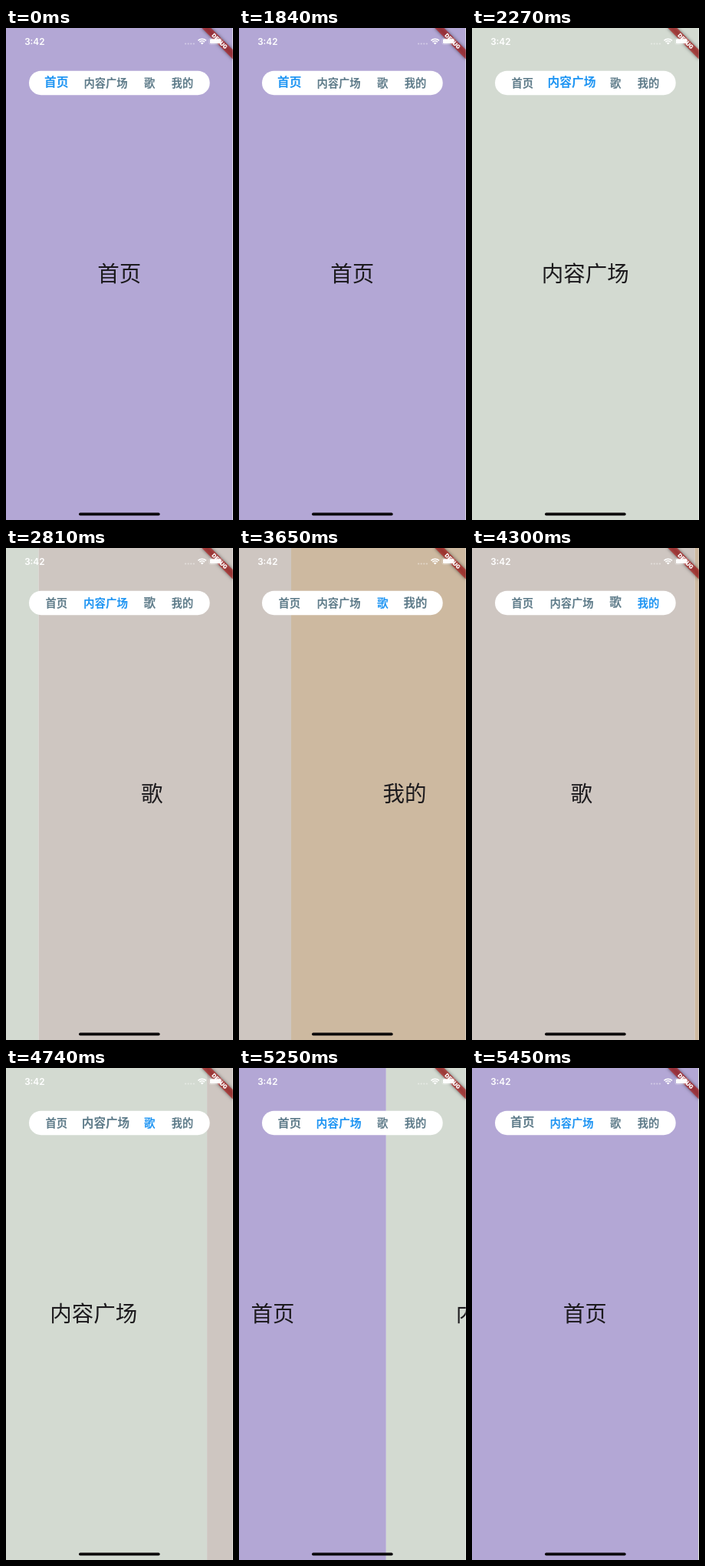
Recreate the animation shown at these times as an HTML page with a canvas. Size 296 px wide and 640 px high, loop 5490 ms.

```html
<!DOCTYPE html>
<html lang="zh-CN">
<head>
<meta charset="utf-8">
<style>
html, body { margin: 0; width: 100%; height: 100%; overflow: hidden; background: #fff; }
canvas { display: block; width: 296px; height: 640px; }
</style>
</head>
<body>
<canvas id="stage"></canvas>
<script>
const LOOP = 5490, TICK = 105, W = 295.7, H = 640;
const CJK = '"Noto Sans CJK SC", "Noto Sans CJK", sans-serif';
const pages = [
  { name: '首页', color: '#b3a7d5', tab: 65.8 },
  { name: '内容广场', color: '#d3dad1', tab: 130 },
  { name: '歌', color: '#cec6c1', tab: 187.2 },
  { name: '我的', color: '#cdb9a0', tab: 230 }
];
// Each swipe lasts a number of ticks; a higher flick makes it settle sooner
const swipes = [
  { to: 1, start: 1840, ticks: 4, flick: 3.5 },
  { to: 2, start: 2590, ticks: 3, flick: 3.3 },
  { to: 3, start: 3430, ticks: 3, flick: 2.5 },
  { to: 2, start: 3980, ticks: 4, flick: 4.9 },
  { to: 1, start: 4530, ticks: 3, flick: 3.7 },
  { to: 0, start: 5030, ticks: 5, flick: 6 }
];

const canvas = document.getElementById('stage');
const ctx = canvas.getContext('2d');
const dpr = window.devicePixelRatio || 1;
canvas.width = 296 * dpr;
canvas.height = 640 * dpr;

const ease = (u, flick) => 1 - (1 - u * u) ** flick;

// The selected tab changes only once the page has arrived
function stateAt(t) {
  let active = 0, pos = 0;
  for (const { to, start, ticks, flick } of swipes) {
    if (t < start) break;
    const u = Math.min(1, Math.floor((t - start) / TICK) / ticks);
    pos = active + (to - active) * ease(u, flick);
    if (u === 1) active = to;
  }
  return { pos, active };
}

function text(str, x, y, font, color) {
  ctx.font = font;
  ctx.fillStyle = color;
  ctx.textAlign = 'center';
  ctx.fillText(str, x, y);
}

function pill(x, y, w, h, r, color) {
  ctx.fillStyle = color;
  ctx.beginPath();
  ctx.roundRect(x, y, w, h, r);
  ctx.fill();
}

function drawPages(pos) {
  pages.forEach((page, i) => {
    const x = (i - pos) * W;
    if (Math.abs(x) >= W) return;
    ctx.fillStyle = page.color;
    ctx.fillRect(x, 0, W, H);
    text(page.name, x + W / 2, 330, '300 28.5px ' + CJK, '#1c1a1d');
  });
}

function drawTabs(pos, active) {
  pill(30, 55.7, 235.7, 31.5, 15.75, '#fff');
  pages.forEach((page, i) => {
    const scale = 1 + .1 * Math.max(0, 1 - Math.abs(pos - i));
    ctx.save();
    ctx.translate(page.tab, 80);
    ctx.scale(scale, scale);
    text(page.name, 0, -3.2, '700 14.3px ' + CJK, i === active ? '#2196f3' : '#607d8b');
    ctx.restore();
  });
}

function drawRibbon() {
  const k = .7143;
  ctx.save();
  ctx.translate(W, 0);
  ctx.rotate(Math.PI / 4);
  ctx.scale(k, k);
  ctx.shadowColor = 'rgba(0,0,0,.8)';
  ctx.shadowBlur = 6 * k * dpr;
  ctx.fillStyle = 'rgba(183,28,28,.63)';
  ctx.fillRect(-40, 28, 80, 12);
  ctx.shadowColor = 'transparent';
  text('DEBUG', 0, 37.7, '900 10.2px Inter, Roboto, sans-serif', '#fff');
  ctx.restore();
}

function drawStatus() {
  const faint = 'rgba(255,255,255,.4)';
  text('3:42', 37.3, 22, '600 11.7px Inter, sans-serif', '#fff');
  for (let i = 0; i < 4; i++) pill(233 + i * 3.6, 19.4, 2.2, 2, 1, faint);

  ctx.strokeStyle = ctx.fillStyle = '#fff';
  ctx.lineWidth = 1.6;
  const arc = (r) => {
    ctx.beginPath();
    ctx.arc(255.7, 21.6, r, -Math.PI * .75, -Math.PI * .25);
  };
  for (const r of [7.4, 4.7]) {
    arc(r);
    ctx.stroke();
  }
  arc(2.8);
  ctx.lineTo(255.7, 21.6);
  ctx.fill();

  ctx.strokeStyle = faint;
  ctx.lineWidth = .7;
  ctx.beginPath();
  ctx.roundRect(264.8, 13.2, 16.8, 8.2, 2.3);
  ctx.stroke();
  pill(266, 14.3, 14.4, 6, 1.3, '#fff');
  pill(282.3, 16, 1, 2.6, .5, faint);
}

function draw() {
  const { pos, active } = stateAt(performance.now() % LOOP);
  ctx.setTransform(dpr, 0, 0, dpr, 0, 0);
  ctx.fillStyle = '#fff';
  ctx.fillRect(0, 0, 296, H);
  ctx.save();
  ctx.beginPath();
  ctx.rect(0, 0, W, H);
  ctx.clip();
  drawPages(pos);
  drawTabs(pos, active);
  drawRibbon();
  drawStatus();
  pill(95, 630.6, 105.7, 3.6, 1.8, '#0a0709');
  ctx.restore();
  requestAnimationFrame(draw);
}
draw();
</script>
</body>
</html>
```
